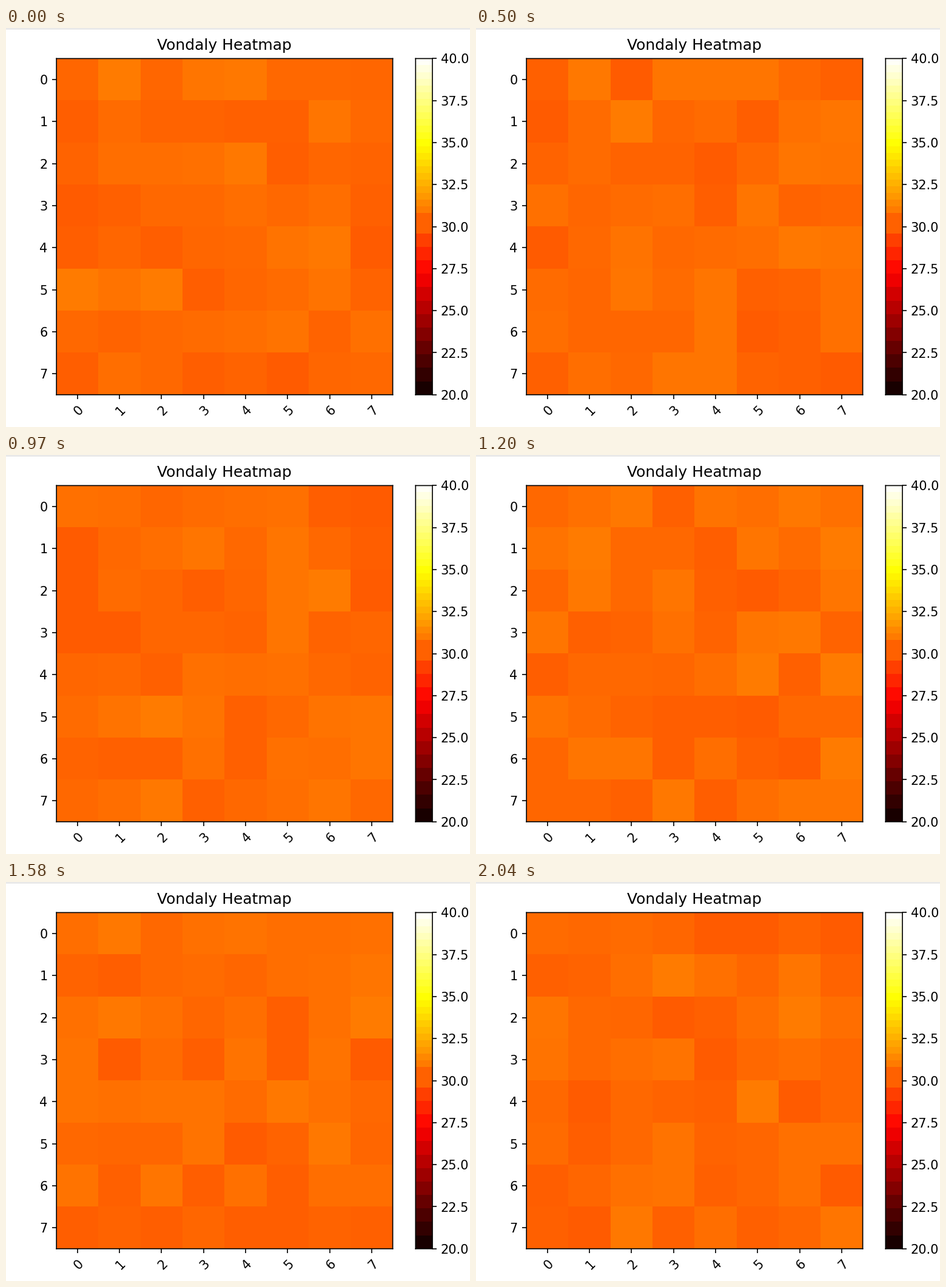
These frames come from a looping animation (765x658 px, 2200 ms). A matplotlib script:

```python
import matplotlib.pyplot as plt
import numpy as np
from matplotlib.animation import FuncAnimation
from matplotlib.lines import Line2D

W, H, DPI = 765, 658, 150
LOOP_MS, STEP_MS = 2200, 10
LOW, HIGH = 20, 40
GRID = 8

plt.rcParams["font.family"] = "DejaVu Sans"

# Moment at which each sensor reading appears.
STARTS = [0, 110, 260, 340, 500, 570, 740, 810, 970,
          1120, 1200, 1350, 1430, 1580, 1660, 1810, 1890, 2040]


def pixel_axes(left, top, width, height):
    axes = fig.add_axes([left / W, 1 - (top + height) / H,
                         width / W, height / H])
    for spine in axes.spines.values():
        spine.set_snap(False)
    return axes


# Noise between 30 and 31 degrees; the first column holds still at the end.
rng = np.random.default_rng(8)
readings = rng.uniform(30, 31, (len(STARTS), GRID, GRID))
readings[-2, :, 0] = readings[-1, :, 0]

fig = plt.figure(figsize=(W / DPI, H / DPI), dpi=DPI, facecolor="white")
fig.add_artist(Line2D([0, 1], [1 - 0.5 / H] * 2, color="#cccccc",
                      lw=72 / DPI))

side, top = 554.4, 50.4
ax = pixel_axes(83.2, top, side, side)
image = ax.imshow(readings[0], cmap="hot", vmin=LOW, vmax=HIGH,
                  interpolation="nearest", aspect="auto")
ax.set_xticks(range(GRID))
ax.set_yticks(range(GRID))
plt.setp(ax.get_xticklabels(), rotation=45, ha="right",
         rotation_mode="anchor")
ax.set_title("Vondaly Heatmap", pad=7)

# Colour scale: broad bands in the dark half, finer ones above.
bar = pixel_axes(675.3, top, side / 20, side)
edges = np.concatenate([np.arange(LOW, 30.2, 0.8),
                        np.arange(30.8, HIGH + 0.1, 0.4)])
edges[-1] = HIGH
middles = (edges[:-1] + edges[1:]) / 2
bar.pcolormesh([0, 1], edges, middles[:, None], cmap="hot",
               vmin=LOW, vmax=HIGH)
bar.set_ylim(LOW, HIGH)
bar.set_xticks([])
bar.set_yticks(np.arange(LOW, HIGH + 1, 2.5))
bar.yaxis.tick_right()
bar.tick_params(pad=3.1)
bar.yaxis.set_major_formatter("{x:.1f}")


def update(frame):
    now = frame * STEP_MS
    index = np.searchsorted(STARTS, now, side="right") - 1
    image.set_data(readings[index])
    return [image]


anim = FuncAnimation(fig, update, frames=LOOP_MS // STEP_MS,
                     interval=STEP_MS, repeat=True, blit=False)
plt.show()
```
